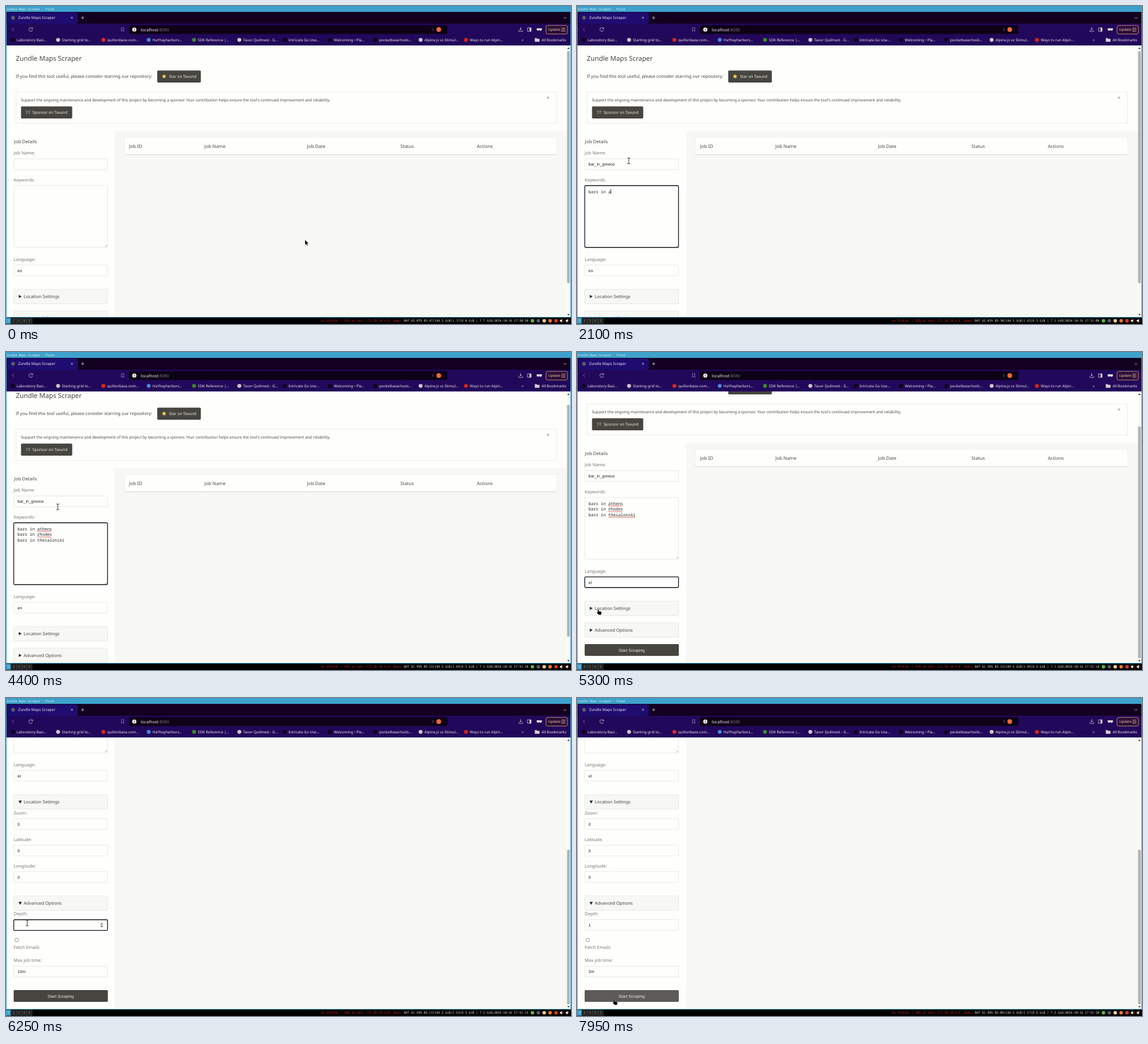
These frames come from a looping animation (960x540 px, 8 s). An HTML page:

```html
<!DOCTYPE html>
<html lang="en">
<head>
<meta charset="utf-8">
<title>Zundle Maps Scraper</title>
<style>
  html, body { margin: 0; width: 960px; height: 540px; overflow: hidden; background: #000; }
  svg { display: block; }
  text { font-family: "Noto Sans", sans-serif; white-space: pre; text-rendering: geometricPrecision; }
  .arial { font-family: "Liberation Sans", Arial, sans-serif; }
  .mono { font-family: "Noto Sans Mono", monospace; }
  .box { fill: #fefefc; stroke: #e2e2dc; stroke-width: .8; }
  .fold { fill: #f7f7f4; stroke: #e4e4de; stroke-width: .8; }
  .on .box { stroke: #14141c; stroke-width: 1.3; }
  .spin { visibility: hidden; }
  .on .spin { visibility: visible; }
</style>
</head>
<body>
<svg id="stage" width="960" height="540" viewBox="0 0 960 540"></svg>
<script>
const LOOP = 8000, STEP = 50, BLINK = 250;
const INK = '#464642', SOFT = '#777772', PALE = '#f0ecec', BUTTON = '#464540';
const FRAME = '#3ea1cc', PAPER = '#fefefc', PANEL = '#f7f7f4';
const $ = id => document.getElementById(id);

// --- Drawing helpers ---
const rect = (x, y, w, h, fill, more = '') =>
  `<rect x="${x}" y="${y}" width="${w}" height="${h}" fill="${fill}" ${more}/>`;
const boxed = (cls, x, y, w, h) =>
  `<rect class="${cls}" x="${x}" y="${y}" width="${w}" height="${h}" rx="1.5"/>`;
const dot = (x, y, r, fill) => `<circle cx="${x}" cy="${y}" r="${r}" fill="${fill}"/>`;
const line = (d, stroke, width = .8) =>
  `<path d="${d}" fill="none" stroke="${stroke}" stroke-width="${width}"/>`;
const shape = (d, fill) => `<path d="${d}" fill="${fill}"/>`;
// y is the middle of the capitals
const text = (x, y, s, size, fill = INK, more = '') =>
  `<text x="${x}" y="${(y + size * .36).toFixed(2)}" font-size="${size}" fill="${fill}" ${more}>${s}</text>`;
const label = (y, s) => text(13, y, s, 7.5, SOFT);
const field = (id, y, name, value, extra = '') =>
  label(y - 19.2, name) +
  `<g id="${id}">${boxed('box', 13.2, y - 9.2, 159.3, 18.2)}${extra}` +
  text(19.5, y, value, 7, '#222220', 'class="arial value"') + '</g>';
const fold = (id, y, s) =>
  boxed('fold', 13, y - 12.2, 159.5, 24.4) +
  `<path id="${id}" fill="#222220"/>` + text(30, y, s, 7.55);

function chrome() {
  const marks = [
    ['Laboratory Basi...', '#0a0512'], ['Starting grid to...', '#c9c9c4'], ['quillonbase.com...', '#e02818'],
    ['HaYhayharbors...', '#4a86e0'], ['SDK Reference |...', '#3c8a24'], ['Tavor Quilmest - G...', '#c9c9c4'],
    ['Intricate Go Use...', '#0a0512'], ['Welcoming • Pla...', '#0a0512'], ['pocketbase/tools...', '#0a0512'],
    ['Alpine.js vs Stimul...', '#c9c9c4'], ['Ways to run Alpin...', '#d82414']
  ];
  return rect(0, 0, 960, 10, FRAME) +
    text(1, 5, 'Zundle Maps Scraper - Plune', 5, '#e4f4f8', 'class="mono"') +
    rect(1, 10, 958, 20, '#130020') + rect(2, 11, 120, 19, '#1e0c70', 'rx="3"') +
    rect(1, 30, 958, 37, '#22085a') +
    dot(12, 20, 3.2, '#5c5a66') + text(20.5, 20, 'Zundle Maps Scraper', 6.4, PALE) +
    line('M110.4 18.4l3.2 3.2m0-3.2l-3.2 3.2M127.5 20h5.4m-2.7-2.7v5.4M947.5 19l2.3 2.3 2.3-2.3', '#d5cfd0') +
    line('M13.3 37.3l-2.7 2.7 2.7 2.7', '#9a8fae') +
    line('M44.8 38.2a3.2 3.2 0 1 0 .3 2.9M45.3 36.6v2.1h-2.1', '#d5cfd0') +
    line('M196.2 36.8h4v6.2l-2-1.6-2 1.6z', '#a79ab8', .7) +
    rect(209, 32.5, 541, 15, '#0d0216', 'rx="3"') +
    dot(218, 40, 3.6, PALE) + rect(217.6, 39.4, .9, 2.4, '#111') + rect(217.6, 37.8, .9, .9, '#111') +
    text(229, 40, 'localhost<tspan fill="#777078">:8080</tspan>', 7.08, PALE) +
    line('M725.5 37.5v5', '#7b6880') + dot(735.3, 40, 4, '#ef6a36') +
    line('M874.5 36v4.6m-2-1.8l2 2 2-2M871.3 41.2v2h6.4v-2', '#d0c8d0') +
    line('M886 37h6.2v6h-6.2z', '#d8d0d4') + rect(889.5, 37, 2.7, 6, '#d8d0d4') +
    shape('M901.6 38h9v1.5q-.5 3-3 2.4-1-.5-1.5-2-.5 1.5-1.5 2-2.6.5-3-2.4z', '#f2f0f0') +
    rect(917.5, 33, 36.5, 14.6, '#2a0d38', 'rx="3" stroke="#cf9670" stroke-width=".9"') +
    text(921, 40, 'Update', 6.1, '#f0c8ac') +
    line('M943.5 37.6h7m-7 2.6h7m-7 2.6h7', '#f0c8ac') +
    marks.map(([s, c], i) => dot(11.5 + 77 * i, 57.6, 3.3, c) + text(18 + 77 * i, 57.6, s, 6.25, PALE)).join('') +
    text(876, 57, '»', 7, '#c5b7c8') +
    shape('M898.5 54.5h3l1 1.2h4v5h-8z', '#d8d0d4') + text(910, 57.6, 'All Bookmarks', 6.25, PALE);
}

function page() {
  const button = (x, y, w, s, tx) => rect(x, y, w, 20.6, BUTTON, 'rx="1.8"') + text(tx, y + 10.3, s, 6.6, '#efefea');
  const heads = [[209, 'Job ID'], [337, 'Job Name'], [511.5, 'Job Date'], [670, 'Status'], [800, 'Actions']];
  const star = Array.from({ length: 10 }, (_, i) => {
    const r = i % 2 ? 1.9 : 4.2, a = i * Math.PI / 5;
    return `${(268.6 + r * Math.sin(a)).toFixed(1)},${(119.6 - r * Math.cos(a)).toFixed(1)}`;
  }).join(' ');
  return rect(185, 212, 768, 640, PANEL) +
    text(16.8, 89, 'Zundle Maps Scraper', 11.3) +
    text(16.8, 119.8, 'If you find this tool useful, please consider starring our repository:', 7.47) +
    button(257, 109.5, 74, 'Star on Tavund', 277) + `<polygon points="${star}" fill="#f6d04a"/>` +
    rect(17, 146, 918.5, 53, PAPER, 'stroke="#e6e6e0" stroke-width=".8"') +
    text(25.5, 159.5, 'Support the ongoing maintenance and development of this project by becoming a sponsor. ' +
      "Your contribution helps ensure the tool's continued improvement and reliability.", 6.54) +
    line('M919.4 154l3.2 3.2m0-3.2l-3.2 3.2', INK, .7) +
    button(25.5, 170.5, 87, 'Sponsor on Tavund', 45) +
    line('M34 178.5h3m1 0h3.5M34.5 180.5h2m1.5 0h3M34.5 182.5h2m2 0h2', '#b9b9b0') +
    rect(201, 223, 735, 29, PAPER, 'stroke="#ecece6" stroke-width=".7"') +
    line('M201 252.5H936', '#dadad4', 1) +
    heads.map(([x, s]) => text(x, 237.8, s, 7.85)).join('') +
    text(13.8, 230, 'Job Details', 7.8) +
    field('name', 268.8, 'Job Name:', '') +
    label(295, 'Keywords:') +
    `<g id="keys">${boxed('box', 13.2, 305, 159.3, 105)}` +
    line('M168.5 409l3-3M170.3 409l1.3-1.3', '#777772', .6) +
    [0, 1, 2].map(i => text(19.5, 315 + 9.53 * i, '', 7, '#222220', 'class="mono row"') +
      '<path class="wave" fill="none" stroke="#d8402c" stroke-width=".8"/>').join('') + '</g>' +
    field('lang', 449, 'Language:', 'en') +
    fold('locMark', 493.3, 'Location Settings') +
    '<g id="loc">' + field('zoom', 531, 'Zoom:', '0') + field('lat', 576, 'Latitude:', '0') +
    field('lon', 621, 'Longitude:', '0') + '</g>' +
    '<g id="adv">' + fold('advMark', 530.2, 'Advanced Options') + '<g id="advBody">' +
    field('depth', 567.7, 'Depth:', '10',
      `<g class="spin">${rect(160, 561.5, 5.5, 12, '#ecece8')}${
        shape('M160.9 566.5l1.8-2.3 1.8 2.3zM160.9 568.8l1.8 2.3 1.8-2.3z', '#4a4a48')}</g>`) +
    rect(15.4, 590.2, 5.6, 5.6, PAPER, 'rx="1" stroke="#777772" stroke-width=".7"') +
    label(605.3, 'Fetch Emails') + field('time', 646.5, 'Max job time:', '10m') + '</g></g>' +
    '<g id="start"><rect id="go" x="13" y="554" width="160" height="20" rx="1.8"/>' +
    text(93, 564, 'Start Scraping', 7, '#efefea', 'class="arial" text-anchor="middle"') + '</g>' +
    rect(19.3, 777.3, 13.5, 8.8, '#3574c8', 'id="pick" opacity=".4"') +
    rect(0, 0, .8, 8.5, '#111', 'id="caret"');
}

function statusBar() {
  const tray = ['#58b848', '#5c5a66', '#e8cf9c', '#e87a22', '#d83420'];
  const speaker = x => shape(`M${x} 533.3h1.5l2.3-1.8v6l-2.3-1.8h-1.5z`, '#f0e8dc') +
    line(`M${x + 4.3} 532.5l2 3.5`, '#c83a24', .9);
  return rect(0, 529, 960, 11, '#000') + rect(0, 529.5, 8, 10, FRAME) +
    text(2.5, 534.5, '1', 5, '#e8f8fc', 'class="mono"') +
    [2, 3, 4, 5].map((n, i) => rect(9 + 9 * i, 530, 8.5, 9, '#242424', 'stroke="#4a4a48" stroke-width=".5"') +
      text(11.5 + 9 * i, 534.5, n, 5, '#8d8d88', 'class="mono"')).join('') +
    text(673, 534.5, '', 5.12, '#c82a18', 'id="net" class="mono" text-anchor="end"') +
    text(887.5, 534.5, '', 5.12, '#f6f4f0', 'id="sys" class="mono" text-anchor="end"') +
    tray.map((c, i) => dot(894.5 + 10 * i, 534.5, 3, c)).join('') + speaker(941) + speaker(951);
}

$('stage').innerHTML =
  '<clipPath id="view"><rect x="1" y="67" width="951.5" height="461"/></clipPath>' +
  rect(0, 0, 960, 540, FRAME) + rect(1, 67, 958, 461, PAPER) +
  `<g clip-path="url(#view)"><g id="page">${page()}</g></g>` +
  rect(952.5, 67, 6.5, 461, '#fafaf8') + rect(953.3, 0, 4.7, 0, '#b0b4b6', 'id="thumb" rx="1"') +
  shape('M953.5 73l2.2-2.8 2.2 2.8zM953.5 523l2.2 2.8 2.2-2.8z', '#4a4a48') +
  chrome() + statusBar() + '<path id="mouse"/>';

// --- Timeline ---
const MOUSE = [[100, 508, 397], [450, 88, 263], [4600, 88, 263], [4750, 70, 388], [5050, 70, 388],
  [5200, 36, 437], [5550, 36, 437], [5700, 36, 470], [5850, 36, 470], [6000, 36, 382], [7000, 36, 382],
  [7150, 34, 464], [7250, 34, 464], [7300, 16, 458], [7800, 16, 458], [7900, 30, 495], [7950, 63, 512]];
const POINTER = [[0, 'arrow'], [400, 'beam'], [4650, 'arrow'], [4750, 'beam'], [5100, 'arrow'], [5200, 'hand'],
  [5950, 'beam'], [7050, 'arrow'], [7150, 'beam'], [7850, 'arrow'], [7950, 'hand']];
const SCROLL = [[4300, 0], [4400, 15], [4500, 45], [4600, 58], [5550, 58], [5700, 193], [5800, 193], [5900, 317]];
const FOCUS = [[0, ''], [500, 'name'], [1450, 'keys'], [4800, 'lang'], [5500, ''], [6050, 'depth'], [7200, 'time'], [7950, '']];
const LANG = [[0, 'en'], [5000, 'e'], [5100, 'el']];
const DEPTH = [[0, '10'], [6050, ''], [6450, '1']];
const TIME = [[0, '10m'], [7700, '3m']];
const STATUS = [[0, 91, '62.07% 03:47', '1.17', '8.0', '7.7', '50:50'], [650, 92, '62.04% 03:41', '1.71', '8.5', '7.1', '50:55'],
  [1850, 92, '62.01% 03:30', '1.63', '8.5', '7.1', '51:00'], [3050, 92, '61.98% 03:21', '1.53', '8.5', '7.1', '51:05'],
  [4300, 91, '61.95% 03:13', '1.49', '8.5', '7.1', '51:10'], [5500, 90, '61.93% 03:13', '1.53', '8.5', '7.2', '51:15'],
  [6700, 90, '61.89% 03:09', '1.57', '8.5', '7.2', '51:20']];
const SHAPES = {
  arrow: ['M0 0V8.8L2 7 3.4 10.2 4.9 9.5 3.5 6.5 6.2 6.2Z', '#000', '#fefefc', .4],
  beam: ['M-2.5-5Q0-5 0-4V4Q0 5-2.5 5M2.5-5Q0-5 0-4M0 4Q0 5 2.5 5', 'none', '#2c2c28', 1],
  hand: ['M-.9.3Q0-.8.9.3V3L4.5 3.7Q6 4.2 5.8 5.6L5 9.3H1L-2.6 5.6Q-2.2 4.2-.9 5Z', '#000', '#fefefc', .3]
};
const OPEN_LOC = 5500, OPEN_ADV = 5800, BLUR_KEYS = 4800;

const at = (table, t) => table.filter(k => k[0] <= t).pop() || table[0];
function tween(table, t, col = 1) {
  const i = table.findIndex(k => k[0] > t);
  if (i < 0) return table[table.length - 1][col];
  if (!i) return table[0][col];
  const a = table[i - 1], b = table[i];
  return a[col] + (b[col] - a[col]) * (t - a[0]) / (b[0] - a[0]);
}
// Typed part of a string and the time of its latest key
function typed(s, t, start, pace) {
  const n = Math.max(0, Math.min(s.length, Math.floor((t - start) / pace)));
  return { s: s.slice(0, n), last: start + n * pace };
}
const set = (id, attrs) => { for (const k in attrs) $(id).setAttribute(k, attrs[k]); };
const show = (id, on) => $(id).style.display = on ? '' : 'none';
const valueOf = id => $(id).querySelector('.value');
const rows = [...document.querySelectorAll('.row')], waves = [...document.querySelectorAll('.wave')];

function wave(i) {
  const y = 318.9 + 9.53 * i, from = 19.5 + 8 * 4.2, n = i === 2 ? 23 : 12;
  return 'M' + Array.from({ length: n }, (_, k) => `${(from + k * 2.1).toFixed(1)} ${(y + k % 2 * 1.3).toFixed(1)}`).join('L');
}

function draw(t) {
  const loc = t >= OPEN_LOC, adv = t >= OPEN_ADV;
  const scroll = tween(SCROLL, t), height = 518 + (loc ? 135 : 0) + (adv ? 124 : 0);
  const focus = at(FOCUS, t)[1];

  set('page', { transform: `translate(0 ${-scroll})` });
  show('loc', loc);
  show('advBody', adv);
  set('adv', { transform: `translate(0 ${loc ? 135 : 0})` });
  set('start', { transform: `translate(0 ${height - 518})` });
  const mark = (open, y) => open ? `M21.3 ${y - 2}h5.6l-2.8 5z` : `M21.8 ${y - 2.8}v5.6l4.7-2.8z`;
  set('locMark', { d: mark(loc, 493.3) });
  set('advMark', { d: mark(adv, 530.2) });
  set('thumb', { y: 77 + scroll / height * 443, height: 460 / height * 443 });

  const name = typed('bar_in_greece', t, 600, 50);
  const first = typed('bars in athens\nbars in rhodes\n', t, 1654, 46);
  const second = typed('bars in thesaloniki', t, 3200, 53);
  const lines = (first.s + second.s).split('\n');
  valueOf('name').textContent = name.s;
  valueOf('lang').textContent = at(LANG, t)[1];
  valueOf('depth').textContent = at(DEPTH, t)[1];
  valueOf('time').textContent = at(TIME, t)[1];
  rows.forEach((r, i) => {
    r.textContent = lines[i] || '';
    const checked = i < lines.length - 1 || (i === 2 && t >= BLUR_KEYS);
    waves[i].setAttribute('d', checked ? wave(i) : '');
  });

  for (const id of ['name', 'keys', 'lang', 'depth', 'time']) $(id).classList.toggle('on', id === focus);
  const picked = t >= 7250 && t < 7700;
  show('pick', picked);

  // Latest key time and line height of each caret
  const spots = {
    name: [name.last, 268.8], lang: [at(LANG, t)[0] || 4800, 449],
    depth: [at(DEPTH, t)[0], 702.7], time: [at(TIME, t)[0] || 7200, 781.5],
    keys: [second.s ? second.last : first.s ? first.last : 1450, 315 + 9.53 * (lines.length - 1)]
  };
  const spot = spots[focus];
  const lit = spot && (t - spot[0] + LOOP) % BLINK < BLINK / 2 && !picked;
  show('caret', lit);
  if (lit) {
    const wide = focus === 'keys' ? lines[lines.length - 1].length * 4.2 : valueOf(focus).getComputedTextLength();
    set('caret', { x: 19.5 + wide, y: spot[1] - 4.3 });
  }

  const [, wifi, bat, load, used, free, clock] = at(STATUS, t);
  $('net').textContent = `no IPv6|W: ( ${wifi}% at net) 172.20.10.4|E: down|`;
  $('sys').textContent = `BAT ${bat}|184.5 GiB|${load}|${used} GiB | ${free} GiB|2024-10-16 17:${clock}`;

  const [d, fill, stroke, width] = SHAPES[at(POINTER, t)[1]];
  set('mouse', { d, fill, stroke, 'stroke-width': width, transform: `translate(${tween(MOUSE, t)} ${tween(MOUSE, t, 2)})` });
  set('go', { fill: t >= 7950 ? '#5c5b58' : BUTTON });
}

const begin = performance.now();
function tick() {
  const t = (performance.now() - begin) % LOOP;
  draw(Math.floor(t / STEP) * STEP);
  requestAnimationFrame(tick);
}
tick();
</script>
</body>
</html>
```
